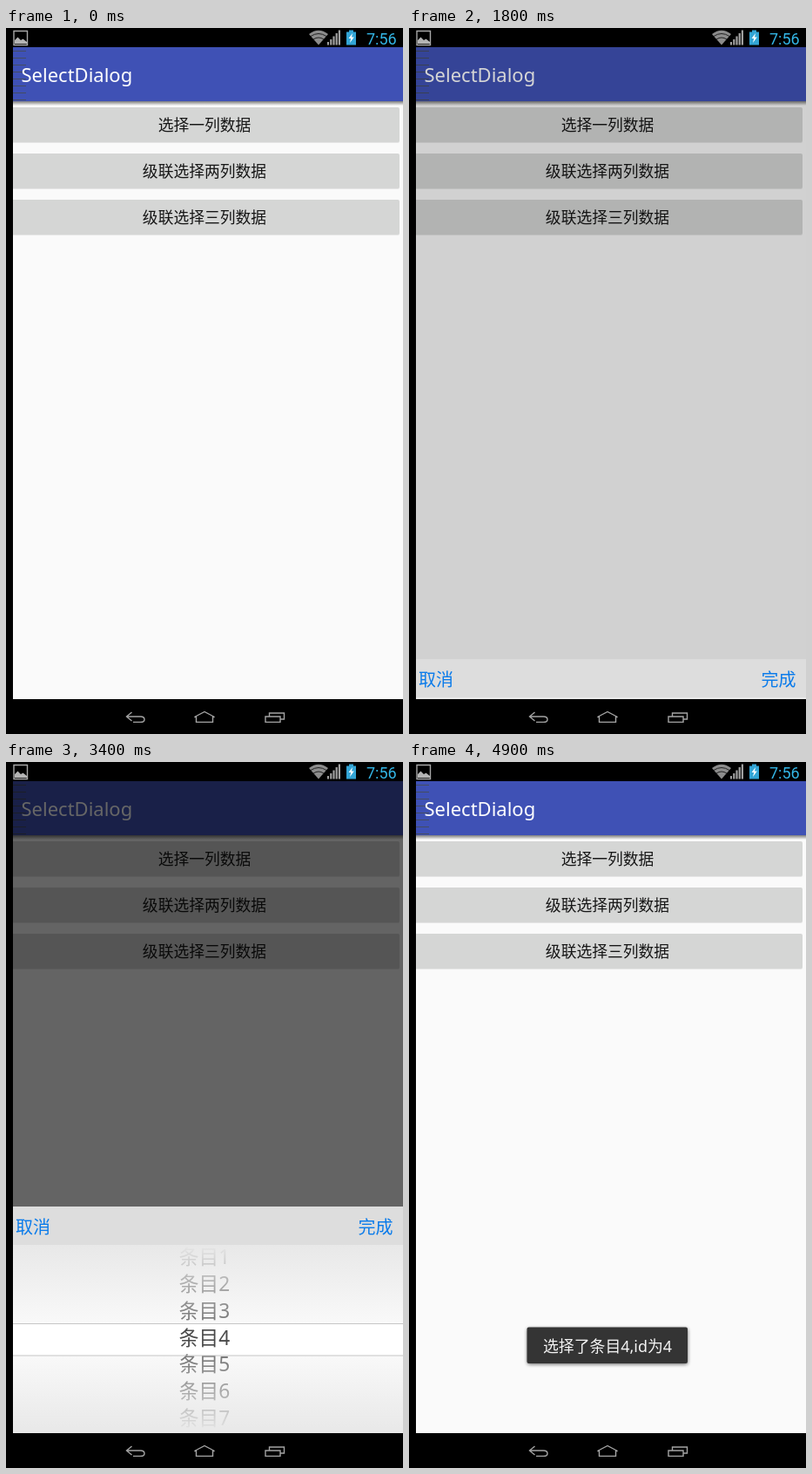
These frames come from a looping animation (456x810 px, 5.1 s). An HTML page:

```html
<!DOCTYPE html>
<html lang="zh">
<head>
<meta charset="utf-8">
<title>SelectDialog</title>
<style>
  html, body { margin: 0; width: 100%; height: 100%; overflow: hidden; background: #000; }
  svg { display: block; width: 100vw; height: 100vh; }
  text { font-family: "Noto Sans", "Noto Sans CJK SC", "Noto Sans CJK", sans-serif; }
  .mid { text-anchor: middle; }
  .button { font-size: 17.8px; fill: #161616; }
  .action { font-size: 20px; fill: #0a7bea; }
  .item { font-size: 22.7px; fill: #4a4a4a; }
  .nav { fill: none; stroke: #a4a4a4; stroke-width: 1.4; }
</style>
</head>
<body>
<svg viewBox="0 0 456 810">
  <defs>
    <linearGradient id="fade" x2="0" y2="1">
      <stop stop-color="#e8e8e8"/>
      <stop offset="1" stop-color="#e8e8e8" stop-opacity=".27"/>
    </linearGradient>
    <linearGradient id="shadow" x2="0" y2="1">
      <stop stop-opacity=".5"/>
      <stop offset="1" stop-opacity="0"/>
    </linearGradient>
    <filter id="blur" x="-10%" y="-40%" width="120%" height="180%">
      <feGaussianBlur stdDeviation="2"/>
    </filter>
    <clipPath id="listClip"><rect y="554" width="456" height="216"/></clipPath>
  </defs>

  <!-- Main screen -->
  <rect y="22" width="456" height="748" fill="#fafafa"/>
  <g id="buttons"></g>
  <rect y="84" width="456" height="5" fill="url(#shadow)"/>
  <rect y="22" width="456" height="62" fill="#3f51b5"/>
  <path d="M15.5 26V84" stroke="#444c62" stroke-width="15" stroke-dasharray="1 7"/>
  <text x="17.5" y="62" font-size="22" fill="#fff">SelectDialog</text>
  <rect id="dim" y="22" width="456" height="748"/>

  <!-- Picker dialog -->
  <g id="panel">
    <rect y="510" width="456" height="44" fill="#ddd"/>
    <text class="action" x="11" y="540.5">取消</text>
    <text class="action" x="444.5" y="540.5" text-anchor="end">完成</text>
    <rect y="554" width="456" height="216" fill="#fff"/>
    <g clip-path="url(#listClip)"><g id="items"></g></g>
    <rect y="554" width="456" height="90" fill="url(#fade)"/>
    <rect y="-770" width="456" height="89" transform="translate(0 0) scale(1 -1)" fill="url(#fade)"/>
    <path d="M0 644.5H456M0 681H456" stroke="#c6c6c6" stroke-width="1.2"/>
  </g>

  <!-- Toast -->
  <g id="toast">
    <rect x="136" y="650" width="184" height="41" rx="2" opacity=".6" filter="url(#blur)"/>
    <rect x="135.5" y="648.5" width="184.5" height="41.5" rx="2" fill="#343434"/>
    <text class="mid" x="228" y="676.5" font-size="17.9" fill="#f4f4f4">选择了条目4,id为4</text>
  </g>

  <!-- System bars -->
  <path d="M0 0H456V22H8V770H456V810H0Z"/>
  <path d="M9 3.5H24.5V19.5H9Z" fill="none" stroke="#a8a8a8" stroke-width="1.4"/>
  <path d="M10 18V14L13.5 10.5L17 14L19.5 12.5L24 16V18Z" fill="#b4b4b4"/>
  <path d="M359 19.5L348 7Q359 -1.5 370 7Z" fill="#8c8c8c"/>
  <path d="M350 9.5Q359 3.5 368 9.5M353 13Q359 9 365 13" fill="none" stroke="#222" stroke-width="1"/>
  <path d="M369 19.5V16H371V19.5ZM372.2 19.5V13H374.4V19.5ZM375.4 19.5V9.5H377.6V19.5ZM378.6 19.5V6H380.8V19.5ZM381.8 19.5V2.5H384V19.5Z" fill="#a0a0a0"/>
  <path d="M391 4.5H394V2.5H399V4.5H402V19.5H391Z" fill="#33a5d6"/>
  <path d="M398 6L393.5 12H396.2L395 17L399.8 10.5H397Z" fill="#fff"/>
  <text x="414" y="19" font-size="18" fill="#33b5e5" style="font-family:Roboto,sans-serif">7:56</text>
  <path class="nav" d="M144.5 785L138.5 790L144.5 795M138.5 790H154.5Q159 790 159 793.2T154.5 796.4H146"/>
  <path class="nav" d="M216.5 790.5L228 784.5L239.5 790.5H237.5V796.4H218.5V790.5Z"/>
  <path class="nav" d="M298 790H315V796.4H298ZM302.5 790V786H319.5V793H315"/>
</svg>
<script>
  const LOOP = 5100, STEP = 100;
  const PANEL_HEIGHT = 260, ITEM_PITCH = 30.75;
  const SLIDE = 250, OPEN_AT = 1731, CLOSE_AT = 4354;
  const $ = id => document.getElementById(id);

  $('buttons').innerHTML = ['选择一列数据', '级联选择两列数据', '级联选择三列数据'].map((label, i) => `
    <g transform="translate(0 ${i * 53})">
      <rect x="4" y="92" width="448" height="40" rx="2" fill="#e6e6e6"/>
      <rect x="4" y="91" width="448" height="40" rx="2" fill="#d5d6d5"/>
      <text class="button mid" x="228" y="118">${label}</text>
    </g>`).join('');

  $('items').innerHTML = Array.from({ length: 10 }, (_, i) =>
    `<text class="item mid" x="228" y="${670.5 + i * ITEM_PITCH}">条目${i + 1}</text>`).join('');

  const progress = (t, start, length) => Math.min(1, Math.max(0, (t - start) / length));
  const easeInOut = x => (1 - Math.cos(Math.PI * x)) / 2;
  const easeOut = x => 1 - (1 - x) ** 2;

  function draw(t) {
    const opening = progress(t, OPEN_AT, SLIDE), closing = progress(t, CLOSE_AT, SLIDE);
    const shown = easeInOut(opening) - easeInOut(closing);
    $('dim').setAttribute('opacity', 0.6 * (opening - closing));
    $('panel').setAttribute('transform', `translate(0 ${PANEL_HEIGHT * (1 - shown)})`);

    // The wheel runs slightly past the fourth item, then settles on it.
    const overshoot = 0.065;
    const position = (3 + overshoot) * easeInOut(progress(t, 2850, 550))
      - overshoot * easeInOut(progress(t, 3400, 500));
    $('items').setAttribute('transform', `translate(0 ${-position * ITEM_PITCH})`);

    $('toast').setAttribute('opacity', easeOut(progress(t, 4433, 500)));
  }

  function tick() {
    const t = performance.now() % LOOP;
    draw(Math.floor(t / STEP) * STEP);
    requestAnimationFrame(tick);
  }
  tick();
</script>
</body>
</html>
```
